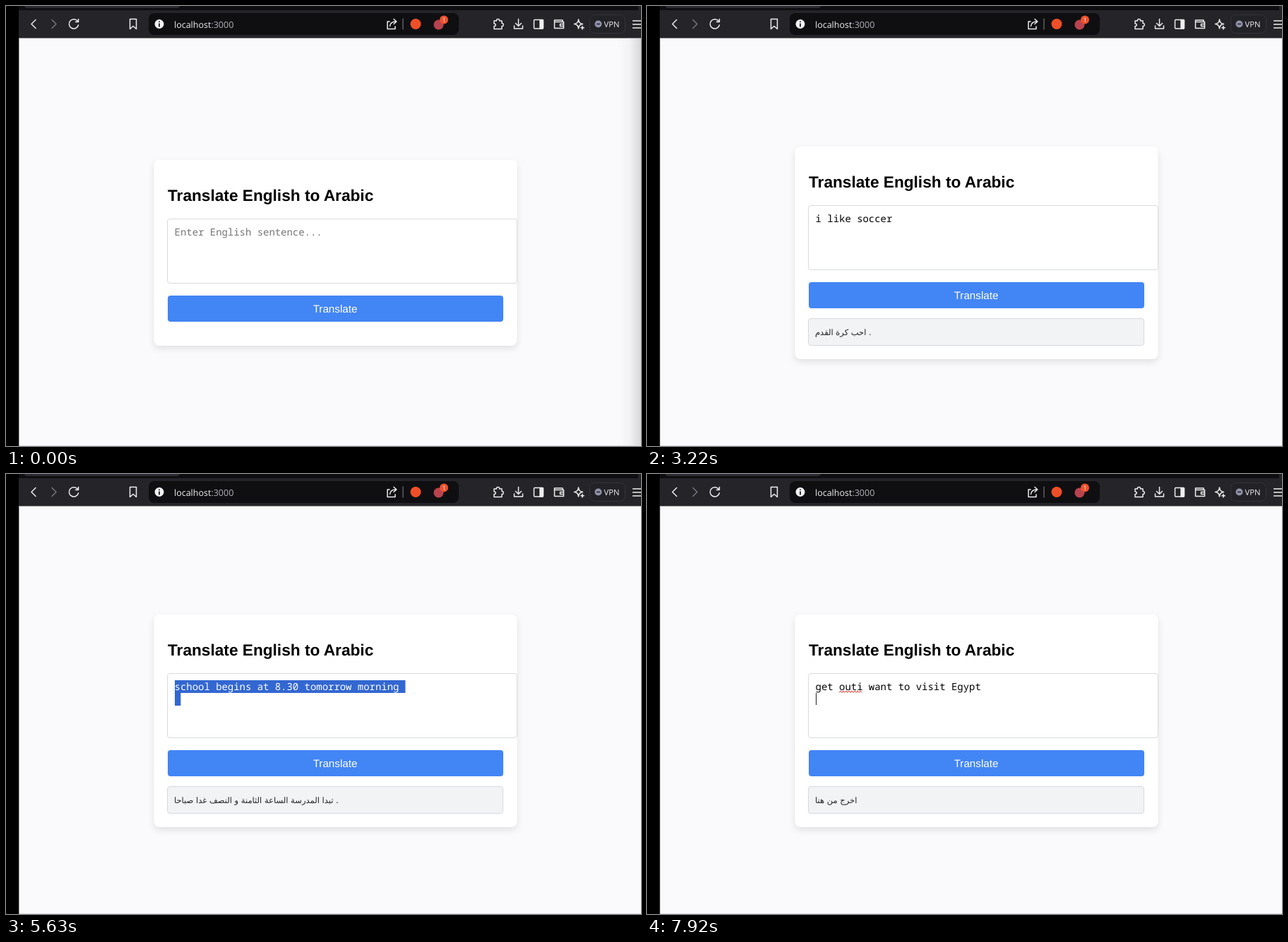
An HTML page that plays this animation: 899x623 px, repeating every 8000 ms.

```html
<!DOCTYPE html>
<html lang="en">
<head>
<meta charset="utf-8">
<title>Translate English to Arabic</title>
<style>
html, body { margin: 0; width: 100%; height: 100%; overflow: hidden; background: #fafafc; }
svg { display: block; width: 899px; height: 623px; }
text { text-rendering: geometricPrecision; white-space: pre; }
.ui { font-family: "Open Sans", sans-serif; fill: #f0f0f2; }
.sans { font-family: "Liberation Sans", Arial, sans-serif; }
.mono { font: 13.95px "Noto Sans Mono", monospace; }
.icon { fill: none; stroke: #eeeef0; stroke-width: 1.5; stroke-linecap: round; stroke-linejoin: round; }
#card { filter: drop-shadow(0 4px 5px rgba(0, 0, 0, .1)); }
</style>
</head>
<body>
<svg viewBox="0 0 899 623">
  <defs>
    <linearGradient id="edge">
      <stop offset="0" stop-opacity="0"/>
      <stop offset=".5" stop-opacity=".03"/>
      <stop offset="1" stop-opacity=".14"/>
    </linearGradient>
  </defs>
  <rect width="899" height="623" fill="#fafafc"/>
  <rect id="shade" x="866" y="46" width="33" height="577" fill="url(#edge)"/>
  <path d="M18 622.5H899" stroke="#dedee2"/>

  <!-- browser bar -->
  <rect x="18" width="881" height="7" fill="#0e0e11"/>
  <rect x="26" y="-6" width="220" height="9" rx="4" fill="#29292f"/>
  <path d="M18 6H899V45.5H18Z" fill="#242429"/>
  <rect x="895" width="4" height="7" fill="#242429"/>
  <rect x="202" y="10" width="439" height="31" rx="8" fill="#0f0f12"/>
  <g class="icon">
    <path d="M42 19.500l-6 6 6 6"/>
    <path d="M65 19.500l6 6-6 6" stroke="#77777d"/>
    <path d="M101.500 21.500A6.700 6.700 0 1 0 102.500 27M102.500 18.500V22.500H98.500"/>
    <path d="M175.500 18.500H184.500V32.500L180 28.500L175.500 32.500Z"/>
    <path d="M543 22H540V32.500H551V29M543.500 28.500C544 23.500 547 22 552.500 22M549 18.500L552.800 22L549 25.500"/>
    <path d="M562 18V33" stroke="#85858b" stroke-width="1"/>
    <path d="M691 21H694.500C693.500 17.500 699.500 17.500 698.500 21H702V24.500C705 23.500 705 29.500 702 28.500V32.500H691V28.500C694 29 694 24.500 691 25Z"/>
    <path d="M725.500 18.500V28M721.500 24.500L725.500 28.500L729.500 24.500M719.500 28V32H731.500V28"/>
    <rect x="747.500" y="19.500" width="13" height="12.500" rx="1"/>
    <path d="M756 20H760V32H756Z" fill="#eeeef0"/>
    <path d="M788 22V20H776.500V31.500H789.500V22.500H777M789.500 25.500H784.500V28.500H789.500"/>
    <path d="M810.500 19Q811 25 816.500 25.500Q811 26 810.500 32Q810 26 804.500 25.500Q810 25 810.500 19ZM816 28.500V33M813.800 30.800H818.200"/>
    <path d="M887 21H899M887 26H899M887 31H899" stroke-linecap="butt"/>
  </g>
  <circle cx="217" cy="25.500" r="6.500" fill="#f2f2f4"/>
  <path d="M217 21.500V23M217 24.500V29.500" stroke="#0f0f12" stroke-width="1.700"/>
  <text class="ui" x="238" y="30.500" font-size="12.500">localhost<tspan fill="#b4b4ba">:3000</tspan></text>
  <circle cx="580" cy="25.500" r="7.500" fill="#ef4f27"/>
  <circle cx="612.500" cy="26.500" r="7" fill="#b8434e"/>
  <circle cx="620" cy="19.500" r="6" fill="#ee512b"/>
  <text class="ui" x="620" y="22.800" font-size="9" text-anchor="middle">1</text>
  <rect x="826.500" y="12.500" width="50" height="26" rx="7" fill="#222227" stroke="#34343b"/>
  <circle cx="838.500" cy="25.500" r="5" fill="#9291a8"/>
  <path d="M836 25.500H841" stroke="#242429" stroke-width="1.500"/>
  <text class="ui" x="846.500" y="29.500" font-size="11.300">VPN</text>
  <rect width="18" height="623"/>
  <path d="M18.500 46V623" stroke="#a5a5a8"/>

  <!-- translator -->
  <g id="panel">
    <rect id="card" x="209.500" width="514" rx="7.500" fill="#fff"/>
    <text class="sans" x="229" y="58" font-size="22.670" font-weight="700">Translate English to Arabic</text>
    <rect x="228.500" y="83.500" width="495" height="91" rx="3.500" fill="#fff" stroke="#d8dade"/>
    <path id="mark" fill="#3367d1"/>
    <text id="input" class="mono" x="238.600" y="107"></text>
    <path id="wave" d="M272 110.500l2-2.500 2 2.500 2-2.500 2 2.500 2-2.500 2 2.500 2-2.500 2 2.500 2-2.500 2 2.500 2-2.500 2 2.500 2-2.500 2 2.500 2-2.500 2 2.500" fill="none" stroke="#e0302a"/>
    <rect id="caret" width="1" height="17" fill="#222"/>
    <g id="button">
      <rect id="face" x="229" y="192" width="475" height="37" rx="4"/>
      <text class="sans" x="466" y="216" font-size="15.200" text-anchor="middle" fill="#fff">Translate</text>
    </g>
    <g id="result">
      <rect x="228.500" y="243.500" width="475" height="38" rx="3.500" fill="#f1f3f4" stroke="#d8dade"/>
      <text id="answer" x="238" y="266.500" font-size="11.500" fill="#222" font-family="'DejaVu Sans', sans-serif" direction="ltr"></text>
    </g>
    <g id="spinner" fill="none" stroke-width="4">
      <circle r="16" stroke="#e3e3e3"/>
      <path id="arc" d="M-11.314-11.314A16 16 0 0 1 11.314-11.314" stroke="#4285f4"/>
    </g>
  </g>
</svg>
<script>
const LOOP = 8000, TURN = 800, CHAR = 8.37, LEFT = 238.6;
const el = id => document.getElementById(id);
const show = (id, on) => el(id).setAttribute("visibility", on ? "visible" : "hidden");
const set = (id, name, value) => el(id).setAttribute(name, value);

const modes = {
  idle: { top: 218, height: 263 },
  spin: { top: 190, height: 318 },
  done: { top: 199, height: 301 }
};
const soccer = "i like soccer";
const school = "school begins at 8.30 tomorrow morning";
const out = "get out";
const likes = "احب كرة القدم .";
const begins = "تبدا المدرسة الساعة الثامنة و النصف غدا صباحا .";
const leave = "اخرج من هنا";

// caret: [column, line]; marked: number of selected lines
const states = [
  { at: 0, mode: "idle", text: "" },
  { at: 650, mode: "idle", text: "", caret: [0, 0] },
  { at: 920, mode: "idle", text: soccer, caret: [0, 1] },
  { at: 1270, mode: "idle", text: soccer, hover: true },
  { at: 1570, mode: "spin", text: soccer },
  { at: 2570, mode: "done", text: soccer, answer: likes },
  { at: 3250, mode: "done", text: soccer, answer: likes, marked: 1 },
  { at: 3420, mode: "done", text: school, answer: likes, caret: [39, 0] },
  { at: 3600, mode: "spin", text: school, delay: 169 },
  { at: 4910, mode: "done", text: school, answer: begins },
  { at: 5630, mode: "done", text: school, answer: begins, marked: 2 },
  { at: 5880, mode: "done", text: out, answer: begins, caret: [7, 0] },
  { at: 6070, mode: "done", text: out, answer: begins, caret: [7, 0], hover: true },
  { at: 6250, mode: "spin", text: out },
  { at: 7190, mode: "done", text: out, answer: leave },
  { at: 7700, mode: "done", text: out, answer: leave, caret: [7, 0] },
  { at: 7920, mode: "done", text: out + "i want to visit Egypt", answer: leave, caret: [0, 1], wave: true }
];
let current;

function apply(s) {
  const { top, height } = modes[s.mode];
  const spinning = s.mode === "spin";
  set("panel", "transform", `translate(0 ${top})`);
  set("card", "height", height);
  set("button", "transform", `translate(0 ${spinning ? 1 : 0})`);
  set("face", "fill", s.hover ? "#357ae8" : "#4285f4");
  el("input").textContent = s.text || "Enter English sentence...";
  set("input", "fill", s.marked ? "#fff" : s.text ? "#000" : "#757575");
  el("answer").textContent = s.answer || "";
  const line = (y, chars) => `M239 ${y}h${chars * CHAR}v18h${-chars * CHAR}z`;
  set("mark", "d", (s.marked ? line(93, s.text.length + 1) : "") + (s.marked > 1 ? line(111, 1) : ""));
  if (s.caret) {
    set("caret", "x", Math.round(LEFT + s.caret[0] * CHAR));
    set("caret", "y", 93 + 18 * s.caret[1]);
  }
  show("caret", s.caret);
  show("wave", s.wave);
  show("result", s.answer);
  show("spinner", spinning);
  show("shade", s.at === 0);
}

function draw(now) {
  const t = now % LOOP;
  const s = states.findLast(state => state.at <= t);
  if (s !== current) apply(current = s);
  const spun = Math.max(0, t - s.at - (s.delay || 0));
  set("spinner", "transform", `translate(466 271) rotate(${spun / TURN * 360})`);
  requestAnimationFrame(draw);
}
draw(performance.now());
</script>
</body>
</html>
```
